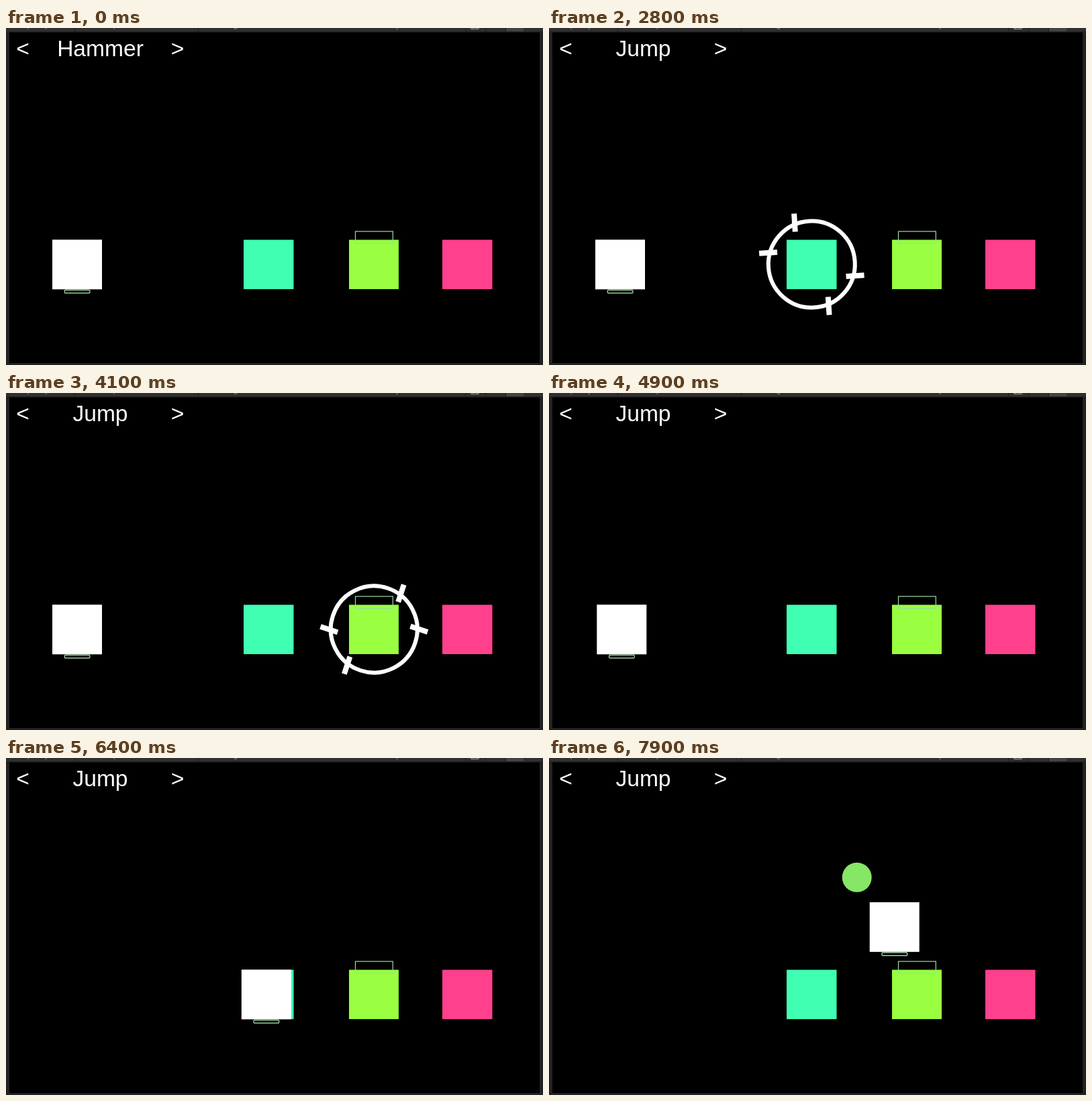
An HTML page for the animation above (8 s loop, 800 px wide and 502 px high).

```html
<!DOCTYPE html>
<html lang="en">
<head>
<meta charset="utf-8">
<title>Turn battle</title>
<style>
  html, body { margin: 0; width: 100%; height: 100%; overflow: hidden; background: #222; }
  svg { display: block; width: 100%; height: 100%; }
  text { font-family: "Liberation Sans", Arial, sans-serif; font-size: 33.6px; fill: #fff; text-anchor: middle; }
  .tab { font-size: 12px; fill: #8a8a8a; }
  .collider { fill: none; stroke: #98dca4; stroke-width: 1.2; }
</style>
</head>
<body>
<svg viewBox="0 0 800 502">
  <rect width="800" height="502" fill="#222"/>
  <rect width="800" height="5" fill="#303030"/>
  <rect x="745" width="26" height="5" fill="#444"/>
  <path d="M102.5 0V5M286.5 0V5M684.5 0V5M714.5 0V5M744.5 0V5" stroke="#1c1c1c"/>
  <g>
    <text class="tab" x="35" y="-1">p</text>
    <text class="tab" x="61" y="-1">y</text>
    <text class="tab" x="163" y="-1">p</text>
    <text class="tab" x="342" y="-1">g</text>
    <text class="tab" x="584" y="-1">y</text>
  </g>
  <path d="M692 0q1 2 3 2M694 0a5 3 0 0 0 9 0M702 2q2 0 3-2" fill="none" stroke="#aaa"/>
  <rect x="5" y="6.5" width="790" height="492.5"/>

  <text x="25" y="41.5">&lt;</text>
  <text id="label" x="140.5" y="41.5">Hammer</text>
  <text x="255.5" y="41.5">&gt;</text>

  <rect x="354" y="315.5" width="74.5" height="73.5" fill="#40ffb3"/>
  <rect x="511" y="315.5" width="74" height="73.5" fill="#99ff40"/>
  <rect x="650" y="315.5" width="74.5" height="73.5" fill="#ff408c"/>

  <g id="reticle" fill="#fff">
    <circle r="64.5" fill="none" stroke="#fff" stroke-width="6"/>
    <rect x="17.3" y="-77" width="8" height="27"/>
    <rect x="-25.3" y="50" width="8" height="27"/>
    <rect x="50" y="-25.3" width="27" height="8"/>
    <rect x="-77" y="17.3" width="27" height="8"/>
  </g>

  <g id="hero">
    <rect width="74" height="74" fill="#fff"/>
    <rect class="collider" x="18.3" y="75.1" width="37.6" height="4.4" rx="1" style="stroke:#b4f0b8"/>
    <circle id="cue" cx="-19" cy="-37" r="22"/>
  </g>
  <rect class="collider" x="520.5" y="303" width="55.8" height="18"/>
</svg>
<script>
  const LOOP = 8000, STEP = 100;
  const HOME = 69, LAUNCH = 383.5, LAND = 511, GROUND = 315.3;
  const PICK = 2800, SWITCH = 3700, WALK = 4800, JUMP = 6800, SLOW = 7400;

  const [label, reticle, hero, cue] =
    ["label", "reticle", "hero", "cue"].map(id => document.getElementById(id));
  const clamp = v => Math.min(1, Math.max(0, v));
  const smooth = v => { const p = clamp(v); return p * p * (3 - 2 * p); };
  const mix = (a, b, p) => a + (b - a) * p;
  const show = (el, on) => el.setAttribute("visibility", on ? "visible" : "hidden");

  function heroPosition(t) {
    if (t < JUMP) return [mix(HOME, LAUNCH, smooth((t - WALK) / 2000)), GROUND];
    // The second half of the leap plays in slow motion.
    const elapsed = Math.min(t, SLOW) - JUMP + Math.max(0, t - SLOW) * 0.37;
    const q = smooth(elapsed / 1180);
    return [mix(LAUNCH, LAND, q), GROUND - 100 * Math.sin(Math.PI * q) - 37 * q];
  }

  function draw(t) {
    label.textContent = t < 900 ? "Hammer" : "Jump";

    show(reticle, t >= PICK && t < WALK);
    const angle = 86.3 - 0.0523 * (t - PICK);
    reticle.setAttribute("transform",
      `translate(${t < SWITCH ? 391.3 : 548.3} 352) rotate(${angle})`);

    hero.setAttribute("transform", `translate(${heroPosition(t)})`);
    show(cue, t >= JUMP);
    cue.setAttribute("fill", t < SLOW ? "#c44242" : "#86e666");
  }

  const start = performance.now();
  function tick() {
    const t = (performance.now() - start) % LOOP;
    draw(Math.floor(t / STEP) * STEP);
    requestAnimationFrame(tick);
  }
  draw(0);
  requestAnimationFrame(tick);
</script>
</body>
</html>
```
